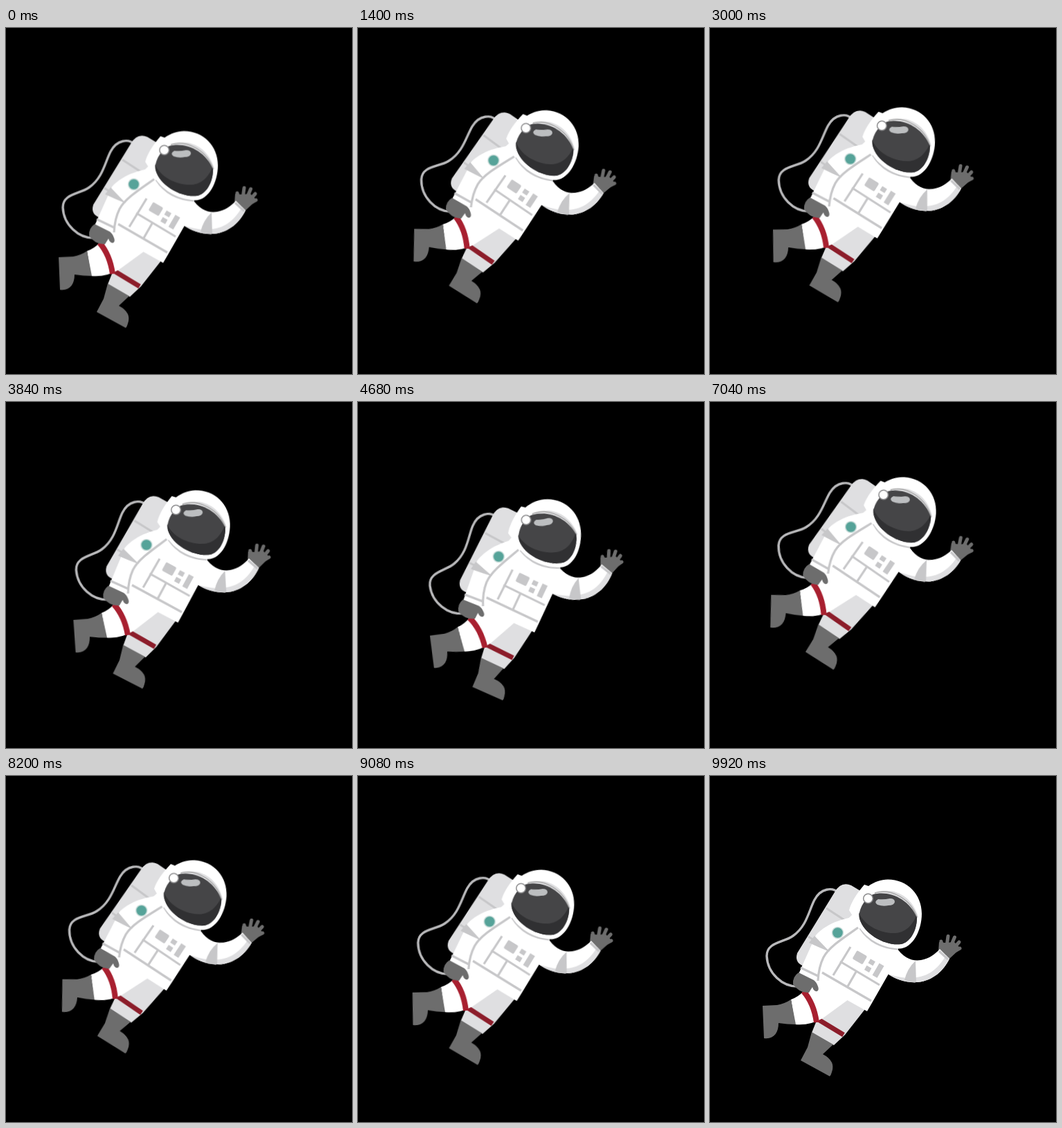
An HTML page without scripts that plays this animation: 500 px wide and 500 px high, repeating every 10000 ms.

```html
<!DOCTYPE html>
<html lang="en">
<head>
<meta charset="utf-8">
<title>Floating astronaut</title>
<style>
  html, body { margin: 0; width: 100%; height: 100%; overflow: hidden; background: #000; }
  svg { display: block; width: 100%; height: 100%; }
  .astronaut {
    transform-origin: 200.5px 305.5px;
    animation: drift 10s cubic-bezier(0, .25, .67, .67) infinite;
  }
  @keyframes drift {
    0%, 99.2%, 100% { transform: translate(0px, 0px) rotate(0deg); }
    24.8% { transform: translate(10.5px, -54.7px) rotate(5.5deg); }
    49.6% { transform: translate(27px, 1.2px) rotate(-6deg); }
    74.4% { transform: translate(11.5px, -53px) rotate(5.5deg); }
  }
  .white { fill: #fff; }
  .pale { fill: #dfdfe1; }
  .grey { fill: #c7c7c9; }
  .glove { fill: #6d6d6d; }
  .seam { fill: none; stroke: #c7c7c9; stroke-width: 3.2; }
  .finger { fill: none; stroke: #6d6d6d; stroke-width: 5; stroke-linecap: round; }
</style>
</head>
<body>
<svg viewBox="0 0 500 500">
  <g class="astronaut">
    <!-- air hose and backpack -->
    <path d="M186 169C177 160 160 162 151 179C143 194 140 217 120 231C106 241 82 240 82 260C83 284 104 306 130 304" fill="none" stroke="#b9b9bb" stroke-width="3.4"/>
    <path class="pale" d="M180 168Q189 152 204 158L224 170L180 270L140 276Q121 272 126 256Z"/>
    <path class="seam" d="M168 191L194 208M142 232L158 242"/>

    <!-- legs -->
    <path class="pale" d="M157 346L147 371L179 389L195 374L224 337L198 320Z"/>
    <path d="M155 351L193 374" stroke="#8c1d2a" stroke-width="7"/>
    <path class="white" d="M117 323Q128 319 135 311L162 284L224 334L200 323L163 350Q144 361 123 359Z"/>
    <path d="M135 311Q150 328 154 356" fill="none" stroke="#a82030" stroke-width="8"/>
    <path class="glove" d="M76 332L97 331Q108 329 117 323L124 359Q112 359 99 357C99 371 92 381 78 379Z"/>
    <path class="glove" d="M147 370L178 388L163 402Q182 412 176 428Q175 432 173 434L131 411L141 392Z"/>

    <!-- waving arm -->
    <path class="glove" d="M330 254L331 240L340 241L353 240L362 249L345 265Z"/>
    <path class="finger" d="M336 248L334 239M342 246L344 231.500M348 246L353.500 233M353 248L360 240M352 254L361 249"/>
    <path class="white" d="M268 246C280 264 293 268 305 266C316 264 325 258 332 250L346 264C338 281 322 296 300 298C283 299 268 294 254 284Z"/>
    <path class="pale" d="M346 264C338 281 322 296 300 298C283 299 268 294 257 286Q280 294 298 291C317 289 331 277 341 259Z"/>
    <path class="grey" d="M297 267Q285 278 281 295Q290 299 298 298Z"/>
    <path class="seam" d="M331 253L344 265"/>

    <!-- torso -->
    <path class="white" d="M210 196L272 246L258 286L234 328L227 340L152 298L160 245Z"/>
    <path class="seam" d="M162 284L233 325M188 268L245 302M203 247L178 288M211 283L199 304"/>
    <g class="grey" transform="translate(216 262) rotate(30)">
      <rect x="-8" y="-7" width="17" height="14" rx="2"/>
      <rect x="15" y="-6" width="8" height="7"/>
      <rect x="15" y="5" width="8" height="7"/>
      <rect x="29" y="-7" width="8" height="20"/>
    </g>

    <!-- resting arm -->
    <path class="white" d="M222 202C198 204 170 211 153 230L128 286L155 299Q162 264 190 241L218 222Z"/>
    <path class="grey" d="M151 231L173 254Q158 248 143 241Z"/>
    <path class="seam" d="M214 219C194 233 172 247 164 262Q157 276 156 296M131 277L156 289"/>
    <path class="glove" d="M128 284Q119 290 120 301Q129 314 143 313Q146 308 148 305Q150 312 155 311Q158 309 156 304Q154 298 150 295Z"/>
    <circle cx="184.500" cy="226.500" r="8" fill="#56a399" stroke="#c9dcd9" stroke-width="1.500"/>

    <!-- helmet -->
    <path class="seam" d="M217 220Q235 248 272 250" stroke-width="4"/>
    <path class="white" d="M223 157L229 159C238 153 247 149.500 257 149.500C285 149.500 306 171 306 199C306 223 293 249.500 273 249.500C247 248 224 234 214 215L201 194Q205 178 223 157Z"/>
    <path class="pale" d="M236 171C258 158 291 169 301 204L298 207Z"/>
    <path d="M238 169C262 161 291 179 299 204" fill="none" stroke="#aaa" stroke-width="1.500"/>
    <path fill="#454547" d="M236 171C258 165 288 177 299 205C299 225 288 241 276 243C255 246 223 230 216 206C213 193 226 174 236 171Z"/>
    <path fill="#303032" d="M215 197C222 215 245 228 268 227C285 226 294 212 298 202L299 205C299 225 288 241 276 243C255 246 223 230 216 206Z"/>
    <path fill="#bcbec0" d="M243 178Q251 179 260 177Q267 177 267 182Q266 187 258 187Q250 189 242 186Q236 182 243 178Z"/>
    <circle class="white" cx="228.500" cy="177" r="6.800" stroke="#8a8a8c" stroke-width="1.500"/>
  </g>
</svg>
</body>
</html>
```
